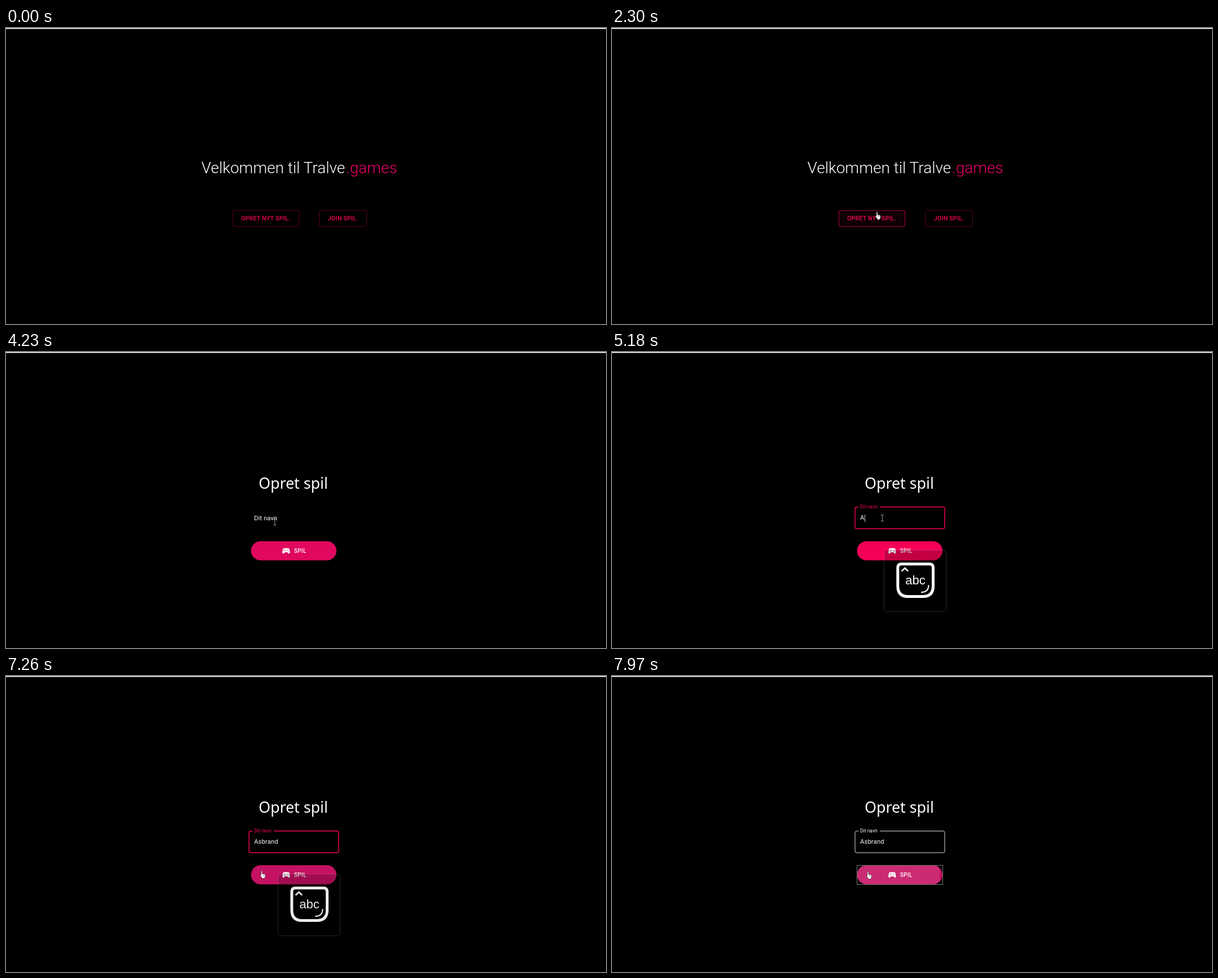
An HTML page for the animation above (8 s loop, 1064 px wide and 526 px high).

```html
<!DOCTYPE html>
<html lang="da">
<head>
<meta charset="utf-8">
<title>Opret spil</title>
<style>
  html, body { margin: 0; width: 100%; height: 100%; overflow: hidden; background: #000; }
  svg { position: absolute; left: 0; top: 0; width: 1064px; height: 526px; }
  text, #name { font-family: Roboto, sans-serif; fill: #fff; }

  /* One 8 s timeline: 1% = 80 ms */
  .fade, .step { animation: var(--k) 8s linear infinite; }
  .step { animation-timing-function: step-end; }

  .title { font-size: 28px; font-weight: 300; }
  .heading { font: 26.8px "Noto Sans", sans-serif; }
  .btn text { font-size: 10.5px; font-weight: 500; letter-spacing: .02857em; fill: #f50057; }
  .btn rect { fill: #f50057; fill-opacity: 0; stroke: #f50057; stroke-opacity: .42; }
  .label { font-size: 11.2px; letter-spacing: .00938em; }
  .spil { font-size: 10px; font-weight: 500; letter-spacing: .02857em; }
  .abc { font: 22px "Liberation Sans", Arial, sans-serif; }
  .line { fill: none; stroke: #fff; }

  #name { position: absolute; left: 440px; top: 286px; height: 18px; display: flex; align-items: center;
    color: #fff; letter-spacing: .00938em; line-height: 18px; }
  #name span { font-size: 0; animation: key 8s step-end infinite; }
  #name i { width: 1px; height: 13px; background: #ccc; opacity: 0; }

  @keyframes key { 0% { font-size: 11.2px; } 60%, 100% { font-size: 0; } }
  @keyframes start { 0% { opacity: 1; } 44.5%, 100% { opacity: 0; } }
  @keyframes create { 0% { opacity: 0; } 44.5%, 100% { opacity: 1; } }

  @keyframes hoverNew {
    0%, 26.66%, 31.25%, 100% { fill-opacity: 0; stroke-opacity: .42; }
    29%, 34%, 46% { fill-opacity: .06; stroke-opacity: .85; }
  }
  @keyframes hoverJoin {
    0%, 24.375%, 28.5%, 100% { fill-opacity: 0; stroke-opacity: .42; }
    25.9% { fill-opacity: .04; stroke-opacity: .65; }
  }
  @keyframes rippleNew {
    0%, 41.5% { transform: scale(0); opacity: .25; }
    44.5%, 100% { transform: scale(70); opacity: .2; }
  }
  @keyframes pill {
    0%, 44.5%, 54.375%, 87.125% { fill: #f50057; }
    48.125%, 52.125%, 90.25%, 100% { fill: #c51162; }
    52.875% { fill: #e0085f; }
  }
  @keyframes ripplePill {
    0%, 94.5% { transform: scale(0); opacity: .12; }
    99.625%, 100% { transform: scale(127); opacity: .11; }
  }
  @keyframes outline { 0% { opacity: 0; } 94.5%, 100% { opacity: 1; } }
  @keyframes label {
    0%, 55.625% { transform: translate(440px, 298.8px); fill: #fff; }
    58.125%, 94.5% { transform: translate(440px, 278px) scale(.75); fill: #f50057; }
    96.5%, 100% { transform: translate(440px, 278px) scale(.75); fill: #fff; }
  }
  @keyframes border {
    0%, 55.625% { stroke: #f50057; stroke-width: 1.4px; opacity: 0; }
    57%, 94.5% { stroke: #f50057; stroke-width: 1.4px; opacity: 1; }
    95.5%, 100% { stroke: #ddd; stroke-width: 1px; opacity: 1; }
  }
  @keyframes caret {
    0%, 61.875%, 76.375%, 88.9%, 100% { opacity: 0; }
    55.625%, 63.75%, 82.6% { opacity: 1; }
  }
  @keyframes panel {
    0%, 61.875%, 95.5%, 100% { opacity: 0; }
    64.375%, 90.375% { opacity: 1; }
  }

  @keyframes mouse {
    0%, 5.875% { transform: translate(1058px, 515px); }
    13% { transform: translate(748px, 298px); }
    15.125% { transform: translate(753px, 291px); }
    16.06%, 17% { transform: translate(1010px, 291px); }
    20% { transform: translate(921px, 336px); }
    25% { transform: translate(600px, 338px); }
    27.5% { transform: translate(480px, 335px); }
    29.75%, 30.75% { transform: translate(462px, 320px); }
    35.5%, 52.125% { transform: translate(451px, 336px); }
    52.875% { transform: translate(476.5px, 302px); }
    55%, 81.25% { transform: translate(479.5px, 295px); }
    85% { transform: translate(462px, 330px); }
    90.75%, 93.5% { transform: translate(453.5px, 346px); }
    94.5%, 100% { transform: translate(454px, 347px); }
  }
  @keyframes arrow {
    0%, 13%, 17%, 24.375%, 26.66%, 31.25%, 87.125%, 100% { opacity: 0; }
    5.875%, 15.125%, 20%, 25.94%, 29.375%, 83.3% { opacity: 1; }
  }
  @keyframes hand {
    0%, 25.94%, 29.375%, 52.5% { opacity: 0; }
    24.375%, 26.66%, 31.25%, 87.125%, 100% { opacity: 1; }
  }
  @keyframes beam {
    0%, 66.75%, 83.3%, 100% { opacity: 0; }
    52.5%, 81.25% { opacity: 1; }
  }
  @keyframes click {
    0%, 42.5%, 56.625%, 95.5%, 100% { opacity: 0; }
    41.375%, 55.625%, 94.5% { opacity: 1; }
  }
</style>
</head>
<body>
<svg viewBox="0 0 1064 526">
  <defs>
    <clipPath id="newClip"><rect x="402" y="324" width="118" height="29.5" rx="3"/></clipPath>
    <clipPath id="pillClip"><rect x="434.5" y="336.3" width="151.5" height="34" rx="17"/></clipPath>
  </defs>
  <rect width="1064" height="1.6" fill="#fff"/>

  <g class="step" style="--k:start">
    <text class="title" x="346.5" y="257.8">Velkommen til Tralve</text>
    <text class="title" x="603" y="257.8" style="fill:#ec0068">.games</text>
    <g class="btn">
      <rect class="fade" style="--k:hoverNew" x="402.3" y="324.3" width="117.4" height="28.6" rx="2.8" stroke-width=".9"/>
      <text x="417" y="342.2">OPRET NYT SPIL.</text>
      <rect class="fade" style="--k:hoverJoin" x="555.6" y="324.3" width="83.8" height="28.6" rx="2.8" stroke-width=".9"/>
      <text x="570.7" y="342.2">JOIN SPIL.</text>
    </g>
    <g clip-path="url(#newClip)"><g transform="translate(451 338)">
      <circle class="fade" style="--k:rippleNew" r="1" fill="#f50057"/>
    </g></g>
  </g>

  <g class="step" style="--k:create">
    <text class="heading" x="448" y="242.8">Opret spil</text>
    <path class="line fade" style="--k:border" d="M437 275.5H434a3 3 0 0 0-3 3V311a3 3 0 0 0 3 3H587a3 3 0 0 0 3-3V278.5a3 3 0 0 0-3-3H475"/>
    <text class="label fade" style="--k:label">Dit navn</text>
    <rect class="fade" style="--k:pill" x="434.5" y="336.3" width="151.5" height="34" rx="17"/>
    <g clip-path="url(#pillClip)"><g transform="translate(454 353)">
      <circle class="fade" style="--k:ripplePill" r="1" fill="#fff"/>
    </g></g>
    <rect class="step" style="--k:outline" x="434.5" y="336.5" width="152" height="34" fill="none" stroke="#777"/>
    <path transform="translate(488.4 344.9) scale(.7)" fill="#fff" d="M21.58 16.09l-1.09-7.66C20.21 6.46 18.52 5 16.53 5H7.47C5.48 5 3.79 6.46 3.51 8.43l-1.09 7.66C2.2 17.63 3.39 19 4.94 19c.68 0 1.32-.27 1.8-.75L9 16h6l2.25 2.25c.48.48 1.13.75 1.8.75 1.56 0 2.75-1.37 2.53-2.91zM11 11H9v2H8v-2H6v-1h2V8h1v2h2v1zm4-1a1 1 0 1 1 0-2 1 1 0 0 1 0 2zm2 3a1 1 0 1 1 0-2 1 1 0 0 1 0 2z"/>
    <text class="spil" x="510.8" y="357.2">SPIL</text>
  </g>

  <g class="fade" style="--k:panel">
    <rect x="482.5" y="352" width="110" height="109.6" rx="5" fill="#000" fill-opacity=".2" stroke="#fff" stroke-opacity=".16"/>
    <path class="line" stroke-width="5" d="M513 376.7H563Q569.5 376.7 569.5 383V416Q569.5 434.5 551 434.5H525Q506.800 434.5 506.800 416V383Q506.800 376.7 513 376.7Z"/>
    <path class="line" stroke-width="2.6" d="M513.500 389.500L519.300 384L525.200 389.500"/>
    <path class="line" stroke-width="2" d="M548 427Q561.500 427 561.500 414"/>
    <text class="abc" x="538" y="412.500" text-anchor="middle">abc</text>
  </g>

  <g class="fade" style="--k:mouse">
    <circle class="step" style="--k:click" cx=".5" cy="1.500" r="9" fill="#d2b400" fill-opacity=".7"/>
    <path class="step" style="--k:arrow" fill="#fff" d="M0 0v11l2.600-2.400 1.700 4 1.600-.7-1.700-3.900h3.600z"/>
    <g class="step" style="--k:hand">
      <path transform="translate(-3.200 0)" fill="#fff" stroke="#000" stroke-width=".5" d="M2.200 1a1 1 0 0 1 2 0v4.200l4 .9q1.200.3 1.200 1.500v2q0 1.500-.8 2.600v1.600h-5v-1.300l-3-4q-.6-1.200.5-1.500l1.100.9z"/>
      <path class="line" style="stroke:#000" stroke-width=".5" d="M2.400 7v2M4.100 7.400v2"/>
    </g>
    <path class="line step" style="--k:beam;stroke:#bbb" stroke-width=".9" d="M-2.500-5.500H-.8L0-5 .8-5.500H2.500M0-5V5M-2.500 5.500H-.8L0 5 .8 5.500H2.500"/>
  </g>
</svg>

<div class="step" id="name" style="--k:create">
  <span style="animation-delay:5.1s">A</span><span style="animation-delay:5.34s">s</span><span style="animation-delay:5.5s">b</span><span style="animation-delay:5.63s">r</span><span style="animation-delay:5.79s">a</span><span style="animation-delay:5.88s">nd</span><i class="step" style="--k:caret"></i>
</div>
</body>
</html>
```
